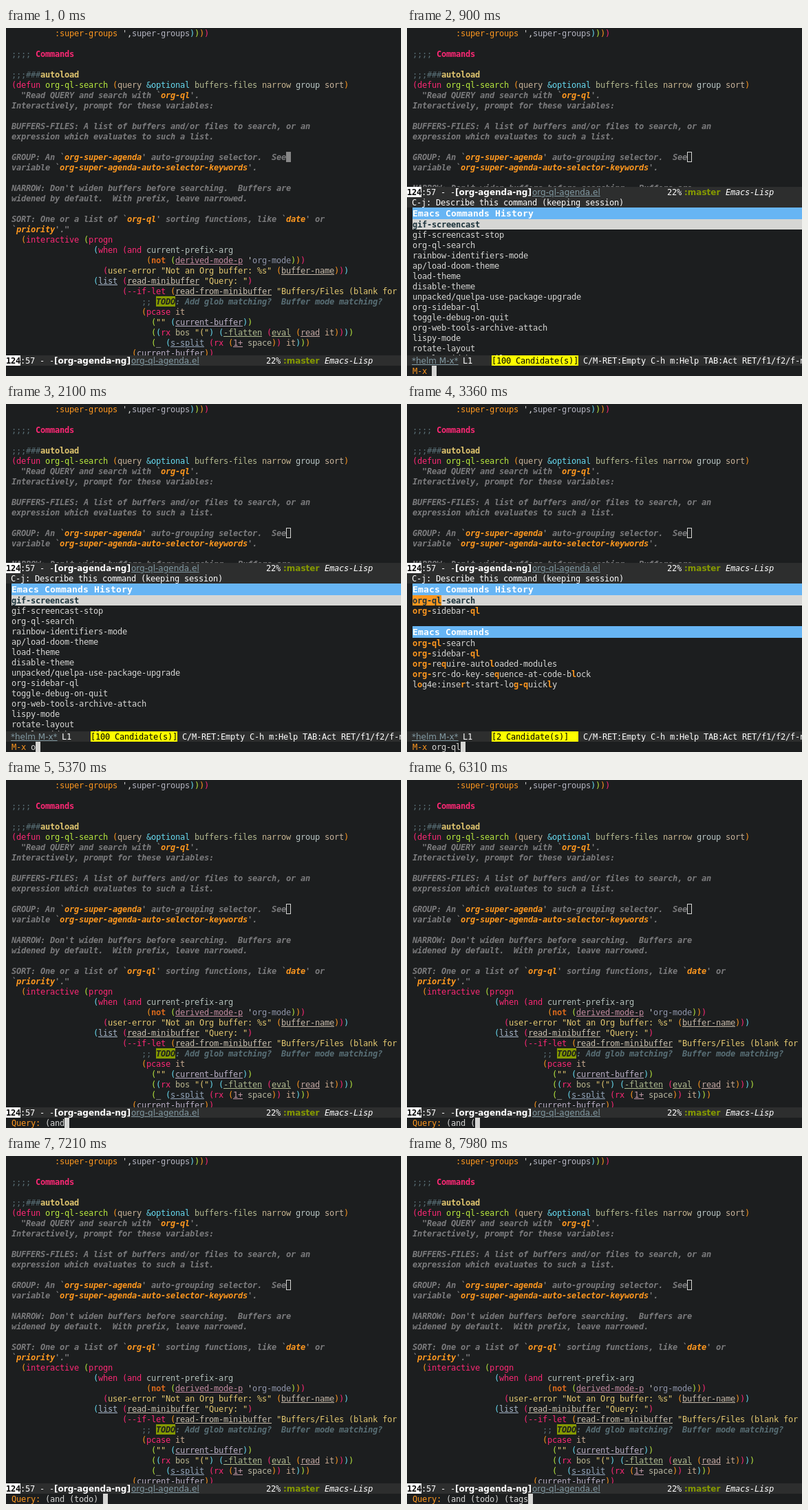
An HTML page for the animation above (8000 ms loop, 574x506 px).

```html
<!DOCTYPE html>
<html lang="en">
<head>
<meta charset="utf-8">
<title>Emacs session</title>
<style>
  html, body { margin: 0; width: 574px; height: 506px; overflow: hidden; background: #1c1e1f; }
  body {
    position: relative; color: #d6d6d4;
    font: 12px/16px "DejaVu Sans Mono", monospace;
    letter-spacing: calc(7px - 1ch);
    font-variant-ligatures: none;
    white-space: pre;
  }
  .box, .bar, .bar > *, .cursor { position: absolute; }
  .box { left: 0; width: 574px; overflow: hidden; }
  .row { height: 15px; padding-left: 8px; }
  .bar { left: 0; width: 574px; height: 15px; overflow: hidden; background: #2d2e2e; color: #fff; }
  .bar > * { top: 0; height: 15px; }
  .sans { font-family: "DejaVu Sans", sans-serif; letter-spacing: 0; }
  .file { color: #829aa3; }
  .file, .fn { text-decoration: underline 1px; text-underline-offset: 1px; }
  .line { background: #fff; color: #000; }
  .count { background: #ff0; color: #000; width: 126px; }
  .cursor { box-sizing: border-box; width: 7px; height: 15px; }
  #point { left: 407px; top: 180px; border: 1px solid #d6d6d4; }
  #point.solid { background: #878787; border: 0; }
  #caret { background: #d6d6d4; }

  .doc { color: #7b7b7d; }
  .note { color: #586e75; }
  .doc, .slant { font-weight: bold; font-style: italic; }
  .todo { background: #859900; color: #1c1e1f; padding-top: 1px; }
  .orange, .prompt { color: #fd971f; }

  .source {
    height: 17px; margin-left: 8px; background: #67b5f4; color: #fff;
    font: bold 13px/17px "DejaVu Sans Mono", monospace;
    letter-spacing: calc(8px - 1ch);
  }
  .item b { color: #fd971f; }
  .picked { margin-left: 8px; padding: 0; background: #d6d6d4; color: #1c333b; font-weight: bold; }
  .picked b { background: #fd971f; color: #1c333b; padding-top: 1px; }
</style>
</head>
<body><script type="text/plain" id="code">
         :super-groups ',super-groups))))

;;;; Commands

;;;###autoload
(defun org-ql-search (query &optional buffers-files narrow group sort)
  "Read QUERY and search with `org-ql'.
Interactively, prompt for these variables:

BUFFERS-FILES: A list of buffers and/or files to search, or an
expression which evaluates to such a list.

GROUP: An `org-super-agenda' auto-grouping selector.  See
variable `org-super-agenda-auto-selector-keywords'.

NARROW: Don't widen buffers before searching.  Buffers are
widened by default.  With prefix, leave narrowed.

SORT: One or a list of `org-ql' sorting functions, like `date' or
`priority'."
  (interactive (progn
                 (when (and current-prefix-arg
                            (not (derived-mode-p 'org-mode)))
                   (user-error "Not an Org buffer: %s" (buffer-name)))
                 (list (read-minibuffer "Query: ")
                       (--if-let (read-from-minibuffer "Buffers/Files (blank for current buffer): ")
                           ;; TODO: Add glob matching?  Buffer mode matching?
                           (pcase it
                             ("" (current-buffer))
                             ((rx bos "(") (-flatten (eval (read it))))
                             (_ (s-split (rx (1+ space)) it)))
                         (current-buffer))
</script><div class="box" id="main" style="top:0"><div class="cursor" id="point"></div></div><div class="bar" id="mode"><b class="line" style="left:0">124</b><span style="left:21px">:57 - -</span><b class="sans" style="left:70px">[org-agenda-ng]</b><span class="sans file" style="left:182px">org-ql-agenda.el</span><span style="left:378px">22%</span><b class="sans" style="left:403px;color:#859900">:master</b><i style="left:463px">Emacs-Lisp</i></div><div id="helm"><div class="bar" style="top:246px"><span style="left:7px">C-j: Describe this command (keeping session)</span></div><div class="box" id="list" style="top:261px;height:215px"></div><div class="bar" style="top:476px"><span class="sans file" style="left:7px">*helm M-x*</span><span style="left:81px">L1</span><span class="count" id="count" style="left:123px"></span><span style="left:256px">C/M-RET:Empty C-h m:Help TAB:Act RET/f1/f2/f-n:NthAct</span></div></div><div class="box" style="top:491px;height:15px"><div class="row"><span class="prompt" id="prompt"></span><span id="typed"></span></div><div class="cursor" id="caret" style="top:0"></div></div><script>
const $ = id => document.getElementById(id);

function add(parent, tag, cls, text = "", color = "") {
  const el = document.createElement(tag);
  el.className = cls;
  el.textContent = text;
  el.style.color = color;
  parent.append(el);
  return el;
}

// Source buffer
const depthColors = ["#fb2874", "#fd971f", "#b6e63e", "#66d9ef"];
const KEY = "#fb2874", STRING = "#e2c770";
const keywords = new Set("defun interactive progn when and pcase --if-let rx".split(" "));
const builtins = {
  "derived-mode-p": "#c08a9f", "buffer-name": "#c5b8a8", "list": "#a5b5c8",
  "read-minibuffer": "#c9bfae", "read-from-minibuffer": "#c9bfae",
  "current-buffer": "#b9aec4", "-flatten": "#adb98f", "eval": "#b5bd92",
  "read": "#c4a9a4", "s-split": "#93a5bb", "1+": "#c29aa8"
};
const names = {
  ":super-groups": "#fd971f", "super-groups": "#b4b4c0", "org-ql-search": "#b6e63e",
  "&optional": "#66d9ef", "query": "#c6b299", "buffers-files": "#b3b88f",
  "narrow": "#c6b48f", "group": "#b9c6c4", "sort": "#c6b299", "org-mode": "#8f95aa",
  "current-prefix-arg": "#b2bfba", "user-error": STRING, "it": "#c9ab91",
  "bos": "#b9b58f", "space": "#b8b6a0"
};

let depth = 4;

function lispToken(row, token) {
  if (token === "(") add(row, "span", "", token, depthColors[depth++ % 4]);
  else if (token === ")") add(row, "span", "", token, depthColors[--depth % 4]);
  else if (token[0] === '"') add(row, "span", "", token, STRING);
  else if (token === "not") add(row, "b", "", token, "#d9691c");
  else if (keywords.has(token)) add(row, "span", "", token, KEY);
  else if (builtins[token]) add(row, "span", "fn", token, builtins[token]);
  else add(row, "span", "", token, names[token]);
}

function comment(row, text) {
  const [, lead, rest] = text.match(/^(\s*;+(?:###)?\s*)(.*)$/);
  add(row, "span", "note", lead);
  if (rest.startsWith("TODO")) {
    add(row, "span", "slant todo", "TODO");
    add(row, "span", "slant note", rest.slice(4));
  } else {
    add(row, "b", "", rest, rest === "autoload" ? STRING : KEY);
  }
}

let inDoc = false;
for (const text of $("code").textContent.slice(1).trimEnd().split("\n")) {
  const row = add($("main"), "div", "row");
  if (text.startsWith('  "')) inDoc = true;
  if (inDoc) {
    row.classList.add("doc");
    text.split(/(?<=`)([\w-]+)(?=')/).forEach((part, i) =>
      add(row, "span", i % 2 ? "orange" : "", part));
    if (text.endsWith('"')) inDoc = false;
  } else if (/^\s*;/.test(text)) {
    comment(row, text);
  } else {
    for (const token of text.match(/"[^"]*"|[()]|[',]+|[^\s()"',]+|\s+/g) || [])
      lispToken(row, token);
  }
}

// Command list: "#" starts a heading, ">" the selection, brackets mark matches
const allCommands = `#Emacs Commands History
>gif-screencast
gif-screencast-stop
org-ql-search
rainbow-identifiers-mode
ap/load-doom-theme
load-theme
disable-theme
unpacked/quelpa-use-package-upgrade
org-sidebar-ql
toggle-debug-on-quit
org-web-tools-archive-attach
lispy-mode
rotate-layout
toggle-sidebar-tail`;
const matches = `#Emacs Commands History
>[org-ql]-search
[org-]sidebar-[ql]

#Emacs Commands
[org-ql]-search
[org-]sidebar-[ql]
[org-]re[q]uire-auto[l]oaded-modules
[org-]src-do-key-se[q]uence-at-code-b[l]ock
l[o]g4e:inse[r]t-start-lo[g-q]uick[l]y`;

function fillList(source) {
  $("list").replaceChildren();
  for (const line of source.split("\n")) {
    const cls = { "#": "source", ">": "row picked" }[line[0]] || "row item";
    const row = add($("list"), "div", cls);
    line.replace(/^[#>]/, "").split(/[[\]]/).forEach((part, i) =>
      add(row, i % 2 ? "b" : "span", "", part));
  }
}

// Timeline
const LOOP = 8000;
const query = "(and (todo) (tags";
const keyTimes = [4880, 5030, 5220, 5370, 5500, 6310, 6430, 6510, 6590,
                  6880, 7090, 7210, 7530, 7650, 7820, 7900, 7980];

function stateAt(t) {
  if (t < 900) return { prompt: "", typed: "" };
  if (t < 4610) {
    return {
      prompt: "M-x ", helm: true,
      typed: t < 2100 ? "" : t < 3360 ? "o" : "org-ql",
      list: t < 3360 ? allCommands : matches,
      count: t < 3360 ? 100 : 2
    };
  }
  return { prompt: "Query: ", typed: query.slice(0, keyTimes.filter(k => k <= t).length) };
}

let shown = "";
function draw(t) {
  const s = stateAt(t);
  const key = s.prompt + s.typed;
  if (key === shown) return;
  shown = key;
  const split = s.helm ? 231 : 476;
  $("main").style.height = $("mode").style.top = split + "px";
  $("point").classList.toggle("solid", !s.prompt);
  $("helm").hidden = !s.helm;
  if (s.helm) {
    fillList(s.list);
    $("count").textContent = `[${s.count} Candidate(s)]`;
  }
  $("prompt").textContent = s.prompt;
  $("typed").textContent = s.typed;
  $("caret").hidden = !s.prompt;
  $("caret").style.left = 8 + 7 * key.length + "px";
}

const start = performance.now();
function tick() {
  draw((performance.now() - start) % LOOP);
  requestAnimationFrame(tick);
}
shown = null;
tick();
</script></body>
</html>
```
